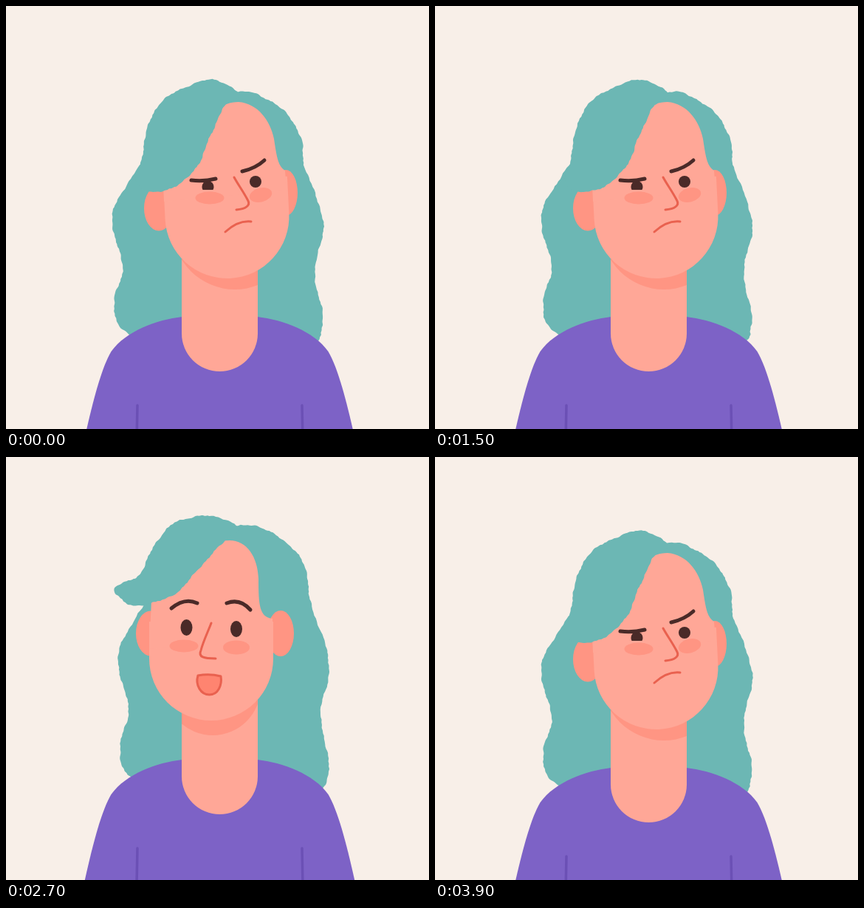
An HTML page with a canvas for the animation above (3.93 s loop, 573 by 573 pixels).

```html
<!DOCTYPE html>
<html>
<head>
<meta charset="utf-8">
<style>
html, body { margin: 0; height: 100%; overflow: hidden; background: #f8efe8; }
canvas { display: block; }
</style>
</head>
<body>
<canvas id="stage" width="573" height="573"></canvas>
<script>
const ctx = document.getElementById('stage').getContext('2d');
const LOOP = 3930, TURN = 600, CHEER_AT = 1810, SULK_AT = 3300;
const BG = '#f8efe8', TEAL = '#6cb7b4', SKIN = '#ffa797', ROSE = '#ff9583', DARK = '#4a2a28',
      RED = '#e9614f', SHIRT = '#7d62c6', SEAM = '#6b50b5';

const backHair = '314,117 350,124 382,148 400,180 404,215 426,275 429,310 418,360 428,412 428,437 422,454 '
  + '380,490 210,480 168,446 149,425 147,395 157,365 155,335 144,300 150,265 184,212 230,140';

// Pairs: sulky pose, cheerful pose.
const fringe = [
  '316,120 282,100 240,111 212,129 196,152 188,182 182,215 176,236 188,251 213,250 240,238 263,210 276,178 295,138',
  '316,95 273,79 245,84 222,93 203,117 190,141 178,162 147,177 155,192 174,201 205,196 236,180 262,150 297,113'];
const forehead = [
  'M315,130 C341,132 358,155 363,180 C367,207 369,217 378,223 L380,250 L214,265 L213,240 L262,170 C275,145 292,130 315,130',
  'M303,113 C326,113 341,135 342,165 C342,200 343,217 361,219 L361,250 L194,260 L197,195 L258,130 C272,117 288,113 303,113'];
const brows = [
  'M251,236 Q268,238 284,234 M320,224 Q338,220 350,209',
  'M224,205 Q242,190 259,198 M299,198 Q317,191 331,207'];
const nose = [
  'M309,232 C315,243 322,252 328,264 C331,270 325,275 312,276',
  'M278,225 C273,238 267,250 264,262 C260,271 268,273 284,273'];

const lerp = (a, b, k) => a + (b - a) * k;
const numbers = text => text.match(/-?[\d.]+/g).map(Number);

// s: 0 sulky to 1 cheerful; nod: drop of the head on the way
let s, nod;

function pose([from, to]) {
  const goal = numbers(to);
  let i = 0;
  return from.replace(/-?[\d.]+/g, n => lerp(+n, goal[i++], s).toFixed(3));
}

function fill(path, color) {
  ctx.fillStyle = color;
  ctx.fill(path);
}

function stroke(path, color, width) {
  ctx.strokeStyle = color;
  ctx.lineWidth = width;
  ctx.stroke(path);
}

function oval(x, y, rx, ry, color, tilt = 0) {
  const path = new Path2D();
  path.ellipse(x, y, rx, ry, tilt, 0, 7);
  fill(path, color);
}

function group(draw, dy = 0, clip) {
  ctx.save();
  ctx.translate(0, dy);
  if (clip) ctx.clip(clip);
  draw();
  ctx.restore();
}

// Smooth closed curve with a restless, ragged edge.
function hair(v, phase) {
  const n = v.length / 2, STEPS = 16, pts = [];
  const spline = (k, f, axis) => {
    const [a, b, c, d] = [-1, 0, 1, 2].map(j => v[(k + j + n) % n * 2 + axis]);
    return b + f / 2 * (c - a + f * (2 * a - 5 * b + 4 * c - d + f * (3 * (b - c) + d - a)));
  };
  for (let i = 0; i < n * STEPS; i++)
    pts.push([0, 1].map(axis => spline(Math.floor(i / STEPS), i % STEPS / STEPS, axis)));
  const path = new Path2D();
  let dist = 0;
  pts.forEach(([x, y], i) => {
    const [px, py] = pts.at(i - 1), [qx, qy] = pts[(i + 1) % pts.length];
    const len = Math.hypot(qx - px, qy - py) || 1;
    dist += len / 2;
    const w = .6 * Math.sin(dist * .11 + phase * 5) + .45 * Math.sin(dist * .27 - phase * 7)
      + .35 * Math.sin(dist * .71 + phase * 11 + 2 * Math.sin(dist * .13));
    path.lineTo(x + (qy - py) / len * w, y - (qx - px) / len * w);
  });
  fill(path, TEAL);
}

function drawBody() {
  for (const side of [1, -1]) {
    ctx.save();
    ctx.translate(289.5, 0);
    ctx.scale(side, 1);
    fill(new Path2D('M-184,590 C-172,535 -160,490 -147,468 C-127,440 -85,425 -51,421 L1,421 L1,590Z'), SHIRT);
    stroke(new Path2D('M-111.5,541 L-112.5,590'), SEAM, 3.5);
    ctx.restore();
  }
  const neck = new Path2D();
  neck.roundRect(238, 330, 103, 165, [0, 0, 51.5, 51.5]);
  fill(neck, SKIN);
  return neck;
}

function drawSkull() {
  oval(lerp(207, 196, s), lerp(274, 239, s), 20, 30.5, ROSE);
  oval(lerp(379, 372, s), lerp(253, 239, s), lerp(16, 18, s), 31, ROSE);
  ctx.translate(lerp(299.5, 278, s), lerp(285, 273, s));
  ctx.rotate(lerp(-.05, 0, s));
  const jaw = new Path2D();
  jaw.roundRect(-84, -50, 168, 134, [0, 0, 84, 84]);
  fill(jaw, SKIN);
}

function drawFeatures() {
  const open = Math.max(0, (s - .7) / .3);
  oval(lerp(276, 241, s), lerp(260, 256, s), 19.5, 8.5, ROSE);
  oval(lerp(345, 312, s), lerp(256, 258, s), lerp(15.5, 18, s), 9.5, ROSE, lerp(-.25, 0, s));

  const eyeY = lerp(245, 231, s), eyeH = 8 + 3 * open, aboveLid = new Path2D();
  aboveLid.rect(0, 0, 573, eyeY + 4 + 8 * s);
  group(() => oval(lerp(273.5, 244.5, s), eyeY, 8, eyeH, DARK), 0, aboveLid);
  oval(lerp(338, 312, s), lerp(238, 233, s), 8, eyeH, DARK);
  stroke(new Path2D(pose(brows)), DARK, 5);
  stroke(new Path2D(pose(nose)), RED, 3);

  const left = lerp(297, 260, s), right = lerp(332, 291, s), mid = (left + right) / 2;
  const leftY = lerp(306, 296, s), rightY = lerp(292, 297, s), top = lerp(290, 293, s);
  const mouth = new Path2D();
  mouth.moveTo(left, leftY);
  mouth.quadraticCurveTo(mid, top, right, rightY);
  if (open) {
    const low = rightY + 25 * open;
    mouth.bezierCurveTo(right + 2, lerp(rightY, low, .5), right - 4, low, mid, low);
    mouth.bezierCurveTo(left + 4, low, left - 4, lerp(leftY, low, .5), left, leftY);
    fill(mouth, '#ff8470');
  }
  stroke(mouth, RED, 3);
}

const ease = u => u < .5 ? 4 * u ** 3 : 1 - 4 * (1 - u) ** 3;
const turn = (t, start) => ease(Math.min(1, Math.max(0, (t - start) / TURN)));

function draw() {
  const t = performance.now() % LOOP, phase = t / LOOP * 2 * Math.PI;
  s = turn(t, CHEER_AT) - turn(t, SULK_AT);
  nod = 10 * Math.sin(Math.PI * s);
  ctx.lineCap = ctx.lineJoin = 'round';
  ctx.fillStyle = BG;
  ctx.fillRect(0, 0, 573, 573);

  // Long hair drifts right and rises, most at the crown.
  hair(numbers(backHair).map((v, i, all) =>
    i % 2 ? v + s * (v * .055 - 31) + nod * .5 : v + s * lerp(8, 4, all[i + 1] < 130)), phase);

  group(() => {
    const neck = drawBody();
    group(() => oval(lerp(310, 280, s), lerp(300, 323, s) + nod * .5, lerp(84, 65, s), lerp(84, 65, s), ROSE), 0, neck);
  }, -11 * s);
  group(drawSkull, nod * .7);
  group(() => fill(new Path2D(pose(forehead)), SKIN), nod * 1.6);
  group(drawFeatures, nod);

  // The hairline swings further down than the crown.
  hair(numbers(pose(fringe)).map((v, i, all) =>
    i % 2 ? v + nod * (.6 + 1.4 * i / all.length) : v), phase + 1);
  requestAnimationFrame(draw);
}
draw();
</script>
</body>
</html>
```
